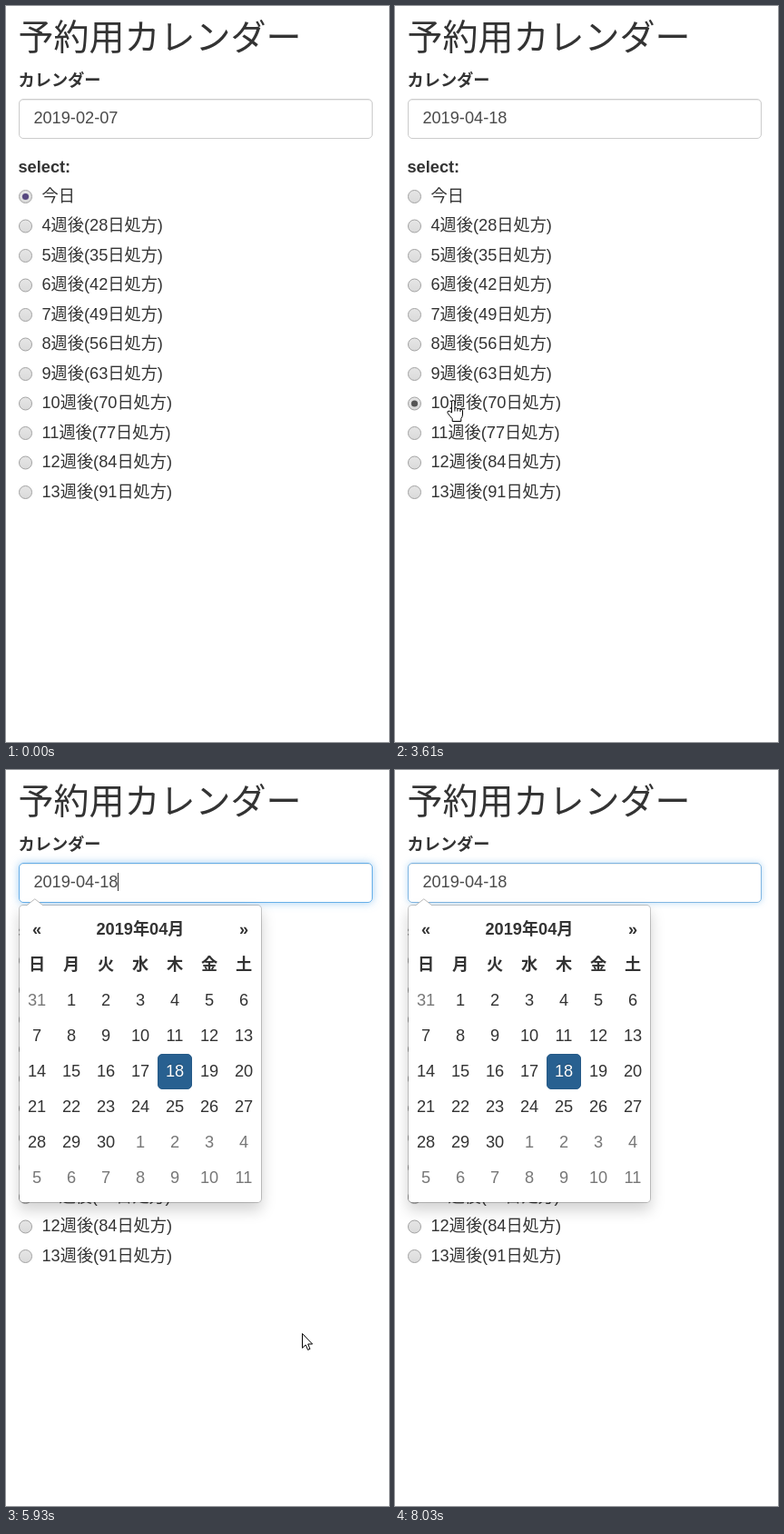
These frames come from a looping animation (422 px wide and 809 px high, 8.12 s). An HTML page:

```html
<!DOCTYPE html>
<html lang="ja">
<head>
<meta charset="utf-8">
<title>予約用カレンダー</title>
<style>
html, body { margin: 0; width: 100%; height: 100%; overflow: hidden; background: #fff; }
svg, div { position: absolute; box-sizing: border-box; }
svg { left: 0; top: 0; width: 422px; height: 809px; overflow: hidden; }
text { font: 18.2px "Liberation Sans", "Noto Sans CJK JP", "Noto Sans CJK", Arial, sans-serif; font-kerning: normal; fill: #333; }
.bold { font-weight: bold; }
.title { font-size: 39px; font-weight: 350; }
.mid { text-anchor: middle; }
.dim { fill: #777; }
#date { fill: #4a4a4a; }
#field { left: 14px; top: 102px; width: 390px; height: 44px; border: 1px solid #ccc; border-radius: 5px; }
#pop { left: 14px; top: 148px; width: 268px; height: 328px; border: 1px solid rgba(0,0,0,.2); border-radius: 5px;
  background: #fff; background-clip: padding-box; box-shadow: 0 8px 16px rgba(0,0,0,.175); }
</style>
</head>
<body>
<div id="field"></div>
<svg id="page">
  <defs>
    <linearGradient id="knob" x2="0" y2="1"><stop stop-color="#e6e6e6"/><stop offset="1" stop-color="#dadada"/></linearGradient>
  </defs>
  <text class="title" x="13.5" y="48">予約用カレンダー</text>
  <text class="bold" x="13.5" y="88">カレンダー</text>
  <text id="date" x="30.4" y="129"></text>
  <rect id="caret" x="123" y="113" width="1" height="20" fill="#333"/>
  <text class="bold" x="13.5" y="183">select:</text>
</svg>
<div id="pop"></div>
<svg id="cal">
  <path d="M22.5 149L31.8 141.8 41 149" fill="#fff" stroke="#bbb"/>
  <rect id="hover" height="39" rx="5" fill="#eee"/>
  <rect x="167.5" y="312.5" width="37" height="38" rx="4.5" fill="#286090" stroke="#265a87"/>
</svg>
<svg id="mouse">
  <g id="arrow"><path d="M.5 .5V16.3L4.2 12.9 6.6 18.4 9 17.4 6.7 12H11.6Z" fill="#fff" stroke="#000"/></g>
  <g id="hand">
    <path d="M-1.5 14V2.2a1.7 1.7 0 0 1 3.4 0V9q1.7-1 3 .6 1.7-.8 3 .7 2.6-.4 2.6 1.7v4q0 2.5-1.7 4.5v3H-.8v-2.8Q-3.5 18-6 14.3q-.6-1.9 1.2-2.2 1.5.2 3.3 1.9z" fill="#fff" stroke="#000" stroke-linejoin="round"/>
    <path d="M1.9 9v3.5M4.9 9.6v3M7.9 10.3v2.6" stroke="#000" fill="none"/>
  </g>
  <g id="beam"><path d="M-3-7.5h3M1-7.5h3M.5-7v14M-3 7.5h3M1 7.5h3" stroke="#000" fill="none"/></g>
</svg>
<script>
const LOOP = 8120, STEP = 77;
const APPEAR = 300, PRESS = 3460, PICK = 3530, UPDATE = 3610;
const OPEN = 4780, LEAVE = 7410, BLUR = 8030;
const SVG = 'http://www.w3.org/2000/svg';
const $ = id => document.getElementById(id);

function add(parent, tag, attrs, text) {
  const el = document.createElementNS(SVG, tag);
  for (const k in attrs) el.setAttribute(k, attrs[k]);
  if (text !== undefined) el.textContent = text;
  parent.appendChild(el);
  return el;
}

// Radio list
const rowY = k => 209.5 + 32.5 * k;
const knobs = [], dots = [];
for (let k = 0; k < 11; k++) {
  const weeks = k + 3, cy = rowY(k);
  const label = k ? `${weeks}週後(${weeks * 7}日処方)` : '今日';
  knobs.push(add($('page'), 'circle', { cx: 21.5, cy, r: 7, fill: 'url(#knob)', stroke: '#a3a3a3' }));
  dots.push(add($('page'), 'circle', { cx: 21.5, cy, r: 3.6, fill: k ? '#555' : '#56487f' }));
  add($('page'), 'text', { x: 39.5, y: Math.round(cy + 5.1) }, label);
}

// Month grid
const cell = (col, row, text, cls) =>
  add($('cal'), 'text', { x: 34 + 38 * col, y: 181 + 39 * row, class: 'mid ' + cls }, text);
cell(0, 0, '«', 'bold');
cell(3, 0, '2019年04月', 'bold');
cell(6, 0, '»', 'bold');
[...'日月火水木金土'].forEach((d, i) => cell(i, 1, d, 'bold'));
for (let i = 0; i < 42; i++) {
  const date = new Date(2019, 2, 31 + i);
  const el = cell(i % 7, 2 + Math.floor(i / 7), date.getDate(), date.getMonth() === 3 ? '' : 'dim');
  if (i === 18) el.style.cssText = 'fill:#fff;text-shadow:0 -1px 0 rgba(0,0,0,.25)';
}

// Pointer strokes, each eased along a curve
const leg = (start, end, d) => {
  const path = document.createElementNS(SVG, 'path');
  path.setAttribute('d', d);
  return { start, end, path, length: path.getTotalLength() };
};
const legs = [
  leg(300, 1220, 'M358 657Q200 330 62 141L55 88'),
  leg(1220, 1780, 'M55 88Q20 62 70 88T141 142'),
  leg(1930, 3000, 'M141 142C185 200 150 330 106 426Q85 440 64 433'),
  leg(4010, 4780, 'M64 433Q150 300 239 132'),
  leg(5240, 5930, 'M239 132C420 140 475 560 326 619'),
  leg(5930, 6310, 'M326 619Q310 660 190 385'),
  leg(6480, 6790, 'M190 385L156 355'),
  leg(6790, 7410, 'M156 355Q170 400 351 800')
];
const ease = u => (1 - Math.cos(Math.PI * u)) / 2;

// The picture is sampled every STEP ms, with a little slack for rounded times
function pointer(t) {
  const now = legs.filter(l => l.start <= t).pop() || legs[0];
  const passed = STEP * Math.floor((t - now.start + 12) / STEP);
  const u = Math.min(1, Math.max(0, passed / (now.end - now.start)));
  const p = now.path.getPointAtLength(now.length * ease(u > .98 ? 1 : u));
  return [Math.round(p.x), Math.round(p.y)];
}

function shape(x, y, open) {
  if (x >= 14 && x < 404 && y >= 102 && y < 146) return 'beam';
  if (open && x >= 15 && x < 281 && y >= 148 && y < 476)
    return y >= 156 && y < 468 && (y < 195 || y >= 234) ? 'hand' : 'arrow';
  const k = Math.round((y - rowY(0)) / 32.5);
  const onLabel = k >= 0 && k < 11 && Math.abs(y - rowY(k)) < 13.5 &&
    x >= 13 && x < (k ? k < 7 ? 173 : 183 : 76);
  return onLabel ? 'hand' : 'arrow';
}

const show = (id, on) => { $(id).style.visibility = on ? 'visible' : 'hidden'; };

function hoverCell(x, y) {
  const col = Math.floor((x - 15) / 38), row = Math.floor((y - 156) / 39);
  const wide = row === 0 && col > 0 && col < 6;
  $('hover').setAttribute('x', 15 + 38 * (wide ? 1 : col));
  $('hover').setAttribute('y', 156 + 39 * row);
  $('hover').setAttribute('width', wide ? 190 : 38);
}

function drawField(t) {
  $('date').textContent = t >= UPDATE ? '2019-04-18' : '2019-02-07';
  show('caret', t >= OPEN && t < BLUR && (t - OPEN + 40) % 995 < 500);
  const glow = t < OPEN ? 0 : t < OPEN + 70 ? .4 : t < BLUR ? 1 : .75;
  const mix = to => Math.round(204 + (to - 204) * glow);
  $('field').style.borderColor = `rgb(${mix(102)},${mix(175)},${mix(233)})`;
  $('field').style.boxShadow =
    `inset 0 1px 1px rgba(0,0,0,.075), 0 0 ${10 * glow}px rgba(102,175,233,${.6 * glow})`;
}

function drawPointer(t, open) {
  const seen = t >= APPEAR && t < LEAVE;
  const [x, y] = pointer(t);
  const kind = shape(x, y, open);
  for (const id of ['arrow', 'hand', 'beam']) {
    show(id, seen && id === kind);
    $(id).setAttribute('transform', `translate(${x} ${y})`);
  }
  const over = open && seen && kind === 'hand' && y < 476;
  show('hover', over);
  if (over) hoverCell(x, y);
}

function draw(t) {
  const open = t >= OPEN;
  const picked = t >= PICK ? 7 : 0;
  dots.forEach((d, k) => { d.style.display = k === picked ? '' : 'none'; });
  knobs[7].setAttribute('fill', t >= PRESS && t < PICK ? '#ccc' : 'url(#knob)');
  drawField(t);
  show('pop', open);
  show('cal', open);
  drawPointer(t, open);
}

const begin = performance.now();
function tick() {
  draw((performance.now() - begin) % LOOP);
  requestAnimationFrame(tick);
}
tick();
</script>
</body>
</html>
```
